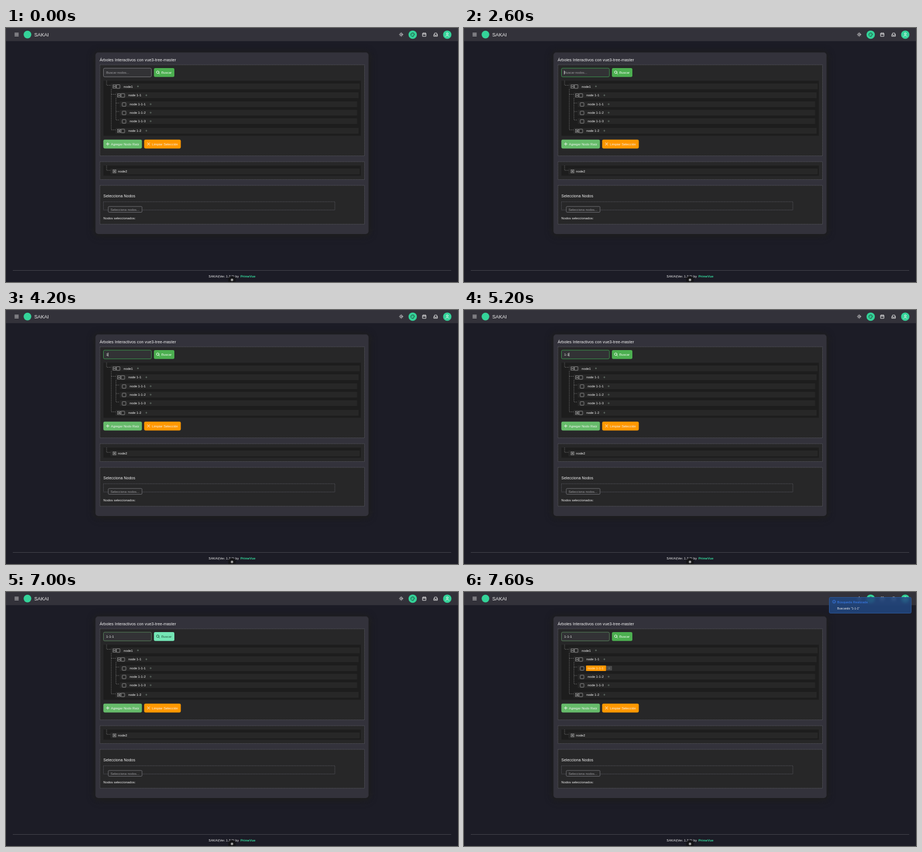
Write an HTML page that moves like this. It is 800x450 px and loops after 8 s.

```html
<!DOCTYPE html>
<html lang="es">
<head>
<meta charset="utf-8">
<title>Árboles Interactivos</title>
<style>
html, body { margin: 0; width: 100%; height: 100%; overflow: hidden; background: #1c1c26; }
body, text { font-family: "Liberation Sans", Arial, sans-serif; font-size: 5.833px; }
#stage { position: relative; width: 800px; height: 450px; overflow: hidden; }
svg { position: absolute; inset: 0; display: block; }
text { fill: #f2f2f2; }
.muted { fill: #a0a0a4; }
.ico { fill: none; stroke: #f2f2f2; stroke-width: .9; stroke-linecap: round; stroke-linejoin: round; }
.card { fill: #33323b; filter: drop-shadow(0 0 5px #1e1e1e) drop-shadow(0 2px 5px #1e1e1e); }
.panel { fill: #272728; stroke: #606068; stroke-width: .7; stroke-dasharray: 1.7 .8; }
.tree { fill: #1d1d1d; }
.row { fill: #272727; }
.link { fill: none; stroke: #9a9a9a; stroke-width: .6; stroke-dasharray: 1.7 1.3; }
.box { fill: none; stroke: #a4a4a4; stroke-width: .75; }
.sign { fill: none; stroke: #d8d8d8; stroke-width: .8; }
.add { fill: none; stroke: #75857a; stroke-width: .7; }

#field, #hint, #caret, #find, #findText, .ico.lens, .hover, .hit, #hitText, #hitAdd, #typed, #toast {
  animation: 8s step-end infinite;
}
#field { fill: #323235; stroke: #85858a; stroke-width: .8; animation-name: field; }
@keyframes field {
  0% { stroke: #85858a; }
  17.5% { stroke: #3c8c4c; }
  20% { stroke: #3fa653; }
  87.5%, 100% { stroke: #5f8f63; }
}
#hint { animation-name: hint; }
@keyframes hint { 0% { opacity: 1; } 47.5%, 100% { opacity: 0; } }

#typed {
  position: absolute; left: 177.3px; top: 75px; height: 8px; line-height: 8px;
  overflow: hidden; white-space: nowrap; color: #f2f2f2; animation-name: typed;
}
@keyframes typed {
  0% { width: 0; }
  47.5% { width: 3.3px; }
  60% { width: 5.2px; }
  62.5% { width: 8.5px; }
  70%, 100% { width: 15px; }
}
#caret { fill: #fff; animation-name: caret; }
@keyframes caret {
  0% { opacity: 0; transform: none; }
  17.5% { opacity: 1; transform: none; }
  25% { opacity: 0; transform: none; }
  32.5% { opacity: 1; transform: none; }
  40% { opacity: 0; transform: none; }
  47.5% { opacity: 1; transform: translateX(3.2px); }
  55% { opacity: 0; transform: translateX(3.2px); }
  60% { opacity: 1; transform: translateX(5.2px); }
  62.5% { opacity: 1; transform: translateX(8.4px); }
  70% { opacity: 1; transform: translateX(13.6px); }
  77.5% { opacity: 0; transform: translateX(13.6px); }
  85% { opacity: 1; transform: translateX(13.6px); }
  87.5%, 100% { opacity: 0; transform: translateX(13.6px); }
}
#find { fill: #4caf50; animation-name: find; }
@keyframes find {
  0%, 92.5%, 100% { fill: #4caf50; }
  82.5% { fill: #4ac781; }
  85% { fill: #74e6b6; }
}
#findText { animation-name: ink; }
@keyframes ink {
  0%, 92.5%, 100% { fill: #f8fff8; }
  82.5% { fill: #62a873; }
  85% { fill: #24553f; }
}
.ico.lens { animation-name: lens; }
@keyframes lens {
  0%, 92.5%, 100% { stroke: #f8fff8; }
  82.5% { stroke: #55b576; }
  85% { stroke: #24553f; }
}
.hover { fill: #4a4a4a; animation-name: hover; }
@keyframes hover {
  0% { opacity: 0; }
  5% { opacity: 1; }
  7.5% { opacity: .5; }
  10% { opacity: 0; }
  95%, 100% { opacity: 1; }
}
.hit { fill: #ff9800; animation-name: hit; }
@keyframes hit { 0% { opacity: 0; } 90%, 100% { opacity: 1; } }
#hitText { animation-name: hitText; }
@keyframes hitText { 0% { fill: #f2f2f2; } 90%, 100% { fill: #ffe9c4; } }
#hitAdd { animation-name: hitAdd; }
@keyframes hitAdd { 0% { transform: none; } 90%, 100% { transform: translateX(1px); } }

#toast {
  position: absolute; left: 646px; top: 9px; width: 146px; height: 28.5px; box-sizing: border-box;
  border: .6px solid #2b5593; border-radius: 2.5px; background: rgba(33, 70, 127, .86);
  backdrop-filter: blur(2px); animation-name: toast;
}
@keyframes toast {
  0% { opacity: 0; transform: translateY(50%); }
  90% { opacity: .72; transform: translateY(4px); }
  92.5%, 100% { opacity: 1; transform: none; }
}
</style>
</head>
<body>
<div id="stage">
<svg width="800" height="450" viewBox="0 0 800 450">
  <defs>
    <rect id="check" class="box" x="-3.2" y="-3.2" width="6.4" height="6.4" rx=".8"/>
    <g id="minus"><rect class="box" x="-2.7" y="-2.7" width="5.4" height="5.4"/><path class="sign" d="M-1.6 0H1.6"/></g>
    <g id="plus"><use href="#minus"/><path class="sign" d="M0-1.6V1.6"/></g>
    <path id="add" class="add" d="M-1.7 0H1.7M0-1.7V1.7"/>
  </defs>

  <!-- top bar -->
  <rect width="800" height="23.3" fill="#33323a"/>
  <path class="ico" d="M15.6 9.2H22M15.6 11.6H22M15.6 14H22"/>
  <circle cx="38" cy="11.6" r="6.8" fill="#34d399"/>
  <text x="50" y="14.8" style="font-size:8.75px">SAKAI</text>
  <g class="ico" transform="translate(699.5 11.6)">
    <circle r="1.7"/>
    <path d="M0-3.3V-3M0 3.3V3M-3.3 0H-3M3.3 0H3M-2.3-2.3l.2.2M2.3 2.3l-.2-.2M-2.3 2.3l.2-.2M2.3-2.3l-.2.2"/>
  </g>
  <circle cx="719.8" cy="11.8" r="7.4" fill="#34d399"/>
  <g class="ico" transform="translate(719.8 11.8)" style="stroke:#20483a">
    <path d="M1 3.2A3.3 3.3 0 1 1 3.3.2C3.2 1.5 1.4.6.8 1.4S1.600 2.800 1 3.200"/>
    <path d="M-1.600-.8h.1M0-1.800h.1M1.600-.9h.1"/>
  </g>
  <path class="ico" d="M737.6 9.4h5.600v5.400h-5.600zM737.6 11.200h5.600M739 8.400v1M741.800 8.400v1"/>
  <path class="ico" d="M757.400 12l1.300-3h3.600l1.300 3v2.700h-6.200zM757.400 12h1.700l.6 1.100h1.600l.6-1.100h1.700"/>
  <circle cx="781" cy="11.800" r="7.400" fill="#34d399"/>
  <g class="ico" transform="translate(781 11.800)"><circle cy="-1.600" r="1.600"/><path d="M-3 3.200C-3 .7 3 .7 3 3.200"/></g>

  <!-- card and panels -->
  <rect class="card" x="158.300" y="43.300" width="483.400" height="321.600" rx="5"/>
  <text x="165.800" y="58.900" style="font-size:7.290px">Árboles Interactivos con vue3-tree-master</text>
  <rect class="panel" x="166.200" y="65.200" width="468.300" height="161.300"/>
  <rect class="panel" x="166.200" y="236.900" width="468.300" height="31.600"/>
  <rect class="panel" x="166.200" y="278.900" width="468.300" height="68.700"/>

  <!-- search -->
  <rect id="field" x="172.500" y="71.200" width="84.800" height="15.400" rx="2.200"/>
  <text id="hint" class="muted" x="177.300" y="81">Buscar nodos...</text>
  <rect id="caret" x="177.300" y="75.600" width=".7" height="6.600"/>
  <rect id="find" x="261.800" y="71" width="36.200" height="15.800" rx="2.400"/>
  <g class="ico lens" transform="translate(269 78.700)"><circle cx="-.4" cy="-.4" r="2.200"/><path d="M1.300 1.300L2.800 2.800"/></g>
  <text id="findText" x="275" y="81">Buscar</text>

  <!-- first tree -->
  <rect class="tree" x="172.500" y="93.500" width="455.500" height="97.300"/>
  <rect class="row" x="185.500" y="98.300" width="440.500" height="10.300"/>
  <rect class="row" x="194" y="114" width="430" height="10.300"/>
  <rect class="row" x="201.500" y="130" width="420" height="10"/>
  <rect class="row" x="201.500" y="145" width="420" height="10"/>
  <rect class="row" x="201.500" y="160" width="420" height="10"/>
  <rect class="row" x="194" y="177" width="430" height="10.300"/>
  <path class="link" d="M178 93.500V101.500H186M186.300 108.600V180.400H194M186.300 117.500H194M194.600 124.500V163H201M194.600 133H201M194.600 148H201"/>

  <use href="#minus" x="192" y="103.600"/><use href="#check" x="198.500" y="103.700"/>
  <text x="208.200" y="105.500">node1</text><use href="#add" x="233.500" y="103.400"/>

  <use href="#minus" x="200.300" y="119.400"/><use href="#check" x="206.800" y="119.500"/>
  <text x="216.400" y="121.300">node 1-1</text><use href="#add" x="248.400" y="119.200"/>

  <rect class="hover" x="252" y="131" width="10" height="8" rx="1"/>
  <rect class="hit" x="216" y="130.200" width="35.500" height="9.800" rx="1"/>
  <use href="#check" x="209" y="135.500"/>
  <text id="hitText" x="219" y="137.100">node 1-1-1</text>
  <g id="hitAdd"><use href="#add" x="256" y="135"/></g>

  <use href="#check" x="209" y="150.500"/>
  <text x="219" y="152.100">node 1-1-2</text><use href="#add" x="256" y="150"/>

  <use href="#check" x="209" y="165.500"/>
  <text x="219" y="167.200">node 1-1-3</text><use href="#add" x="256" y="165.100"/>

  <use href="#plus" x="200.300" y="182.300"/><use href="#check" x="206.800" y="182.400"/>
  <text x="216.400" y="184.200">node 1-2</text><use href="#add" x="248.400" y="182"/>

  <!-- actions -->
  <rect x="172.300" y="197.800" width="68.300" height="15.600" rx="2.400" fill="#66bb6a"/>
  <path class="ico" d="M177.500 205.500h5M180 203v5"/>
  <text x="185.800" y="207.600">Agregar Nodo Raíz</text>
  <rect x="244.500" y="197.800" width="64.900" height="15.600" rx="2.400" fill="#ff9800"/>
  <path class="ico" d="M250.300 203.400l4.200 4.200M254.500 203.400l-4.200 4.200"/>
  <text x="258.200" y="207.600">Limpiar Selección</text>

  <!-- second tree -->
  <rect class="tree" x="172.500" y="243.800" width="455.500" height="17.800"/>
  <rect class="row" x="185" y="249" width="441" height="10.300"/>
  <path class="link" d="M178 243.800V252.200H185.500"/>
  <use href="#plus" x="192" y="254"/>
  <text x="198.200" y="256.300">node2</text>

  <!-- selection -->
  <text x="172.300" y="299.800" style="font-size:7px">Selecciona Nodos</text>
  <rect class="panel" x="172.500" y="307.800" width="409.500" height="14.600"/>
  <rect x="181" y="316.200" width="59.800" height="10.300" rx="1.600" fill="#29292a" stroke="#85858a" stroke-width=".7"/>
  <text class="muted" x="185" y="323.700">Selecciona nodos...</text>
  <text x="172.300" y="338.700">Nodos seleccionados:</text>

  <!-- footer -->
  <path d="M12 429.500H788" stroke="#4c4c55" stroke-width=".8"/>
  <text x="358.600" y="441.800">SAKAI(Ver. 1.2.0) by</text>
  <text x="414.900" y="441.800" style="fill:#34d399;font-weight:bold">PrimeVue</text>
  <circle cx="400" cy="446.500" r="7" fill="#151518"/>
  <circle cx="400" cy="446.300" r="2.200" fill="#a0a0a0"/>
</svg>
<div id="typed">1-1-1</div>
<div id="toast">
  <svg width="146" height="28" viewBox="0 0 146 28">
    <g class="ico" transform="translate(8 7.200)" style="stroke:#3b82f6;stroke-width:.7"><circle r="2.700"/><path d="M0-1.300v.1M0 0V1.300"/></g>
    <text x="13.600" y="9.800" style="fill:#3b82f6">Búsqueda Realizada</text>
    <text x="13.600" y="20.900" style="font-size:5.100px">Buscando "1-1-1"</text>
  </svg>
</div>
</div>
</body>
</html>
```
